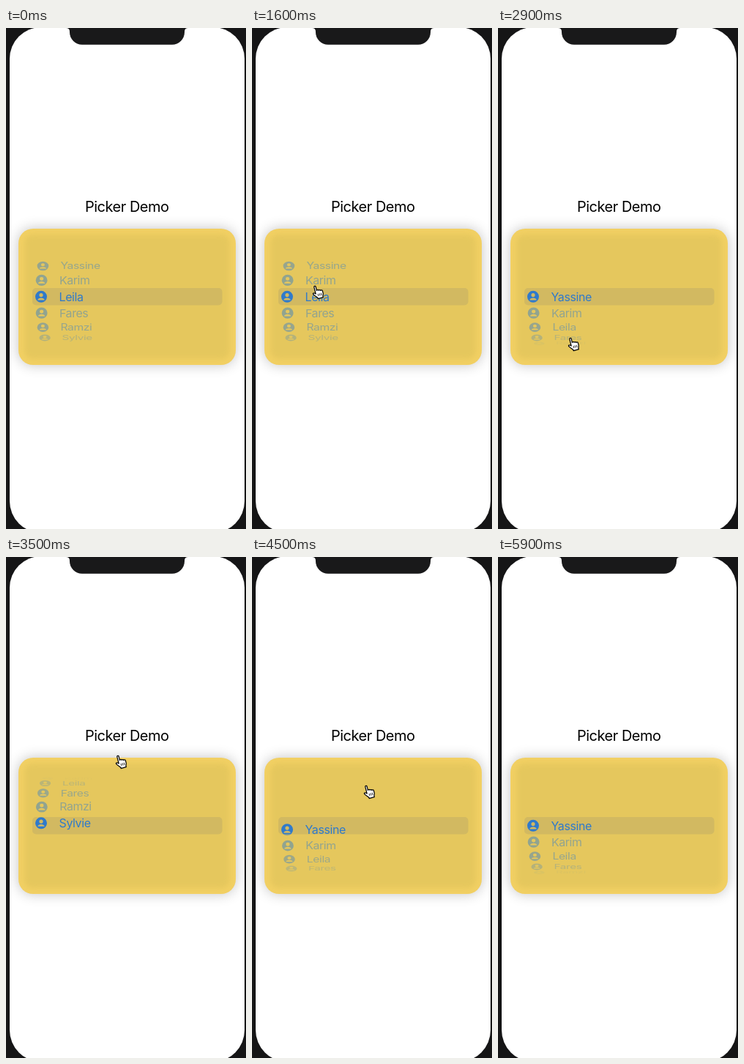
Recreate the animation shown at these times as an HTML page with a canvas. Size 328x684 px, loop 6300 ms.

```html
<!DOCTYPE html>
<html lang="en">
<head>
<meta charset="utf-8">
<title>Picker Demo</title>
<style>
  html, body { margin: 0; width: 100%; height: 100%; overflow: hidden; background: #151516; }
  canvas { display: block; width: 328px; height: 684px; }
</style>
</head>
<body>
<canvas></canvas>
<script>
const WIDTH = 328, HEIGHT = 684, LOOP = 6300, STEP = 100;
const NAMES = ['Yassine', 'Karim', 'Leila', 'Fares', 'Ramzi', 'Sylvie'];
const BLUE = '#2f7acb';
const BAR = [36, 355, 259.5, 23.5];
const WHEEL = { x: 165.5, y: 366.8, radius: 72, depth: 670, step: 18.2 * Math.PI / 180 };

const FLICKS = [
  { start: 1600, from: 2, to: 0, damping: 2.8 },
  { start: 2900, from: 0, to: 5, damping: 5.8 },
  { start: 4000, from: 5, to: 0, damping: 5.8 }
];

// Places where the pointer turns: [time, x, y]
const TURNS = [
  [500, 310, 486], [1500, 90, 361], [1600, 90, 361], [2000, 104, 520], [2300, 104, 511],
  [2900, 103, 432], [3200, 148, 222], [3500, 157, 280], [3900, 159, 273],
  [4200, 166, 408], [4500, 160, 321], [4900, 320, 214]
];

const hand = new Path2D('M5 1.5C5 .3 7.2 .3 7.2 1.5V6.5C8 5.8 9.4 6 9.6 7C10.6 6.4 11.8 6.8 12 7.8' +
  'C13 7.3 14.2 7.9 14.2 9V11.5C14.2 13.5 13 14.5 13 16V17H6.2V16C5 14.3 3 12.5 2 10.5' +
  'C1 9 2.6 8.3 3.6 9.2L5 10.5Z');
const knuckles = new Path2D('M7.6 11V14M9.6 11V14M11.6 11V14');

const person = new Path2D();
person.arc(0, 0, 8, 0, 7);
person.moveTo(2.6, -2.2);
person.arc(0, -2.2, 2.6, 0, 7);
person.addPath(new Path2D('M-4.8 4.6C-4.2 .6 4.2 .6 4.8 4.6Z'));

const canvas = document.querySelector('canvas');
const ctx = canvas.getContext('2d');
const ratio = window.devicePixelRatio || 1;
canvas.width = WIDTH * ratio;
canvas.height = HEIGHT * ratio;
ctx.scale(ratio, ratio);

// Each flick swings past its row once and then rests on it.
function scrollAt(time) {
  const flick = FLICKS.findLast(({ start }) => time >= start);
  if (!flick) return FLICKS[0].from;
  const seconds = (time - flick.start) / 1000;
  if (seconds >= .9) return flick.to;
  const swing = Math.exp(-flick.damping * seconds) * Math.cos(seconds / .6 * Math.PI);
  return flick.to + (flick.from - flick.to) * swing;
}

function pointerAt(time) {
  const next = TURNS.findIndex(turn => turn[0] > time);
  if (next < 1) return null;
  const [start, x0, y0] = TURNS[next - 1], [end, x1, y1] = TURNS[next];
  const part = (time - start) / (end - start);
  const ease = part * part * (3 - 2 * part);
  return [x0 + (x1 - x0) * ease, y0 + (y1 - y0) * ease];
}

function box(color, x, y, w, h, radius) {
  ctx.fillStyle = color;
  ctx.beginPath();
  ctx.roundRect(x, y, w, h, radius);
  ctx.fill();
}

function text(label, x, y, size, spacing) {
  ctx.font = `${size}px Inter, sans-serif`;
  ctx.letterSpacing = spacing + 'px';
  ctx.fillText(label, x, y);
}

function drawPhone() {
  box('#151516', 0, 0, WIDTH, HEIGHT, 0);
  box('#fff', 5, -1, 321, 690, 43);
  box('#19191a', 87, -20, 157, 42.8, 17);
  ctx.fill(new Path2D('M82 0Q87 0 87 5V0ZM249 0Q244 0 244 5V0Z'));
  ctx.fillStyle = '#000';
  text('Picker Demo', 108, 250.5, 20, -.5);
}

function drawCard() {
  ctx.save();
  ctx.shadowColor = 'rgba(0,0,0,.24)';
  ctx.shadowBlur = 18 * ratio;
  box('#f2d063', 17, 274, 297, 186, 20);
  ctx.restore();
  ctx.save();
  ctx.filter = `blur(${3.5 * ratio}px)`;
  box('#e5c75d', 25, 282, 281, 170, 12);
  ctx.restore();
  box('#d2b961', ...BAR, 5);
}

function drawRows(scroll, selected) {
  ctx.save();
  ctx.beginPath();
  if (!selected) ctx.rect(0, 0, WIDTH, HEIGHT);
  ctx.rect(...BAR);
  ctx.clip('evenodd');
  ctx.fillStyle = BLUE;
  NAMES.forEach((name, i) => {
    const angle = (i - scroll) * WHEEL.step;
    const facing = Math.cos(angle);
    const fade = Math.min(1, 1.6 * facing - .35);
    if (Math.abs(angle) > 1.5 || fade <= 0) return;
    const scale = 1 / (1 + WHEEL.radius * (1 - facing) / WHEEL.depth);
    ctx.save();
    ctx.globalAlpha = selected ? 1 : .46 * fade;
    ctx.translate(WHEEL.x, WHEEL.y + WHEEL.radius * Math.sin(angle) * scale);
    ctx.scale(scale, scale * facing);
    ctx.translate(-WHEEL.x, 0);
    text(name, 72.5, 5.7, 16, -.4);
    ctx.translate(48, 0);
    ctx.fill(person, 'evenodd');
    ctx.restore();
  });
  ctx.restore();
}

function drawPointer(x, y) {
  ctx.save();
  ctx.translate(x, y);
  ctx.rotate(-.25);
  ctx.scale(1.08, 1.08);
  ctx.translate(-8, -9.3);
  ctx.fillStyle = '#fff';
  ctx.strokeStyle = '#000';
  ctx.lineJoin = 'round';
  ctx.lineWidth = 1.15;
  ctx.fill(hand);
  ctx.stroke(hand);
  ctx.lineWidth = .7;
  ctx.stroke(knuckles);
  ctx.restore();
}

function draw(now) {
  const time = Math.floor(now % LOOP / STEP) * STEP;
  const scroll = scrollAt(time);
  const pointer = pointerAt(time);
  drawPhone();
  drawCard();
  drawRows(scroll, false);
  drawRows(scroll, true);
  if (pointer) drawPointer(...pointer);
}

function loop() {
  draw(performance.now());
  requestAnimationFrame(loop);
}
loop();
</script>
</body>
</html>
```
